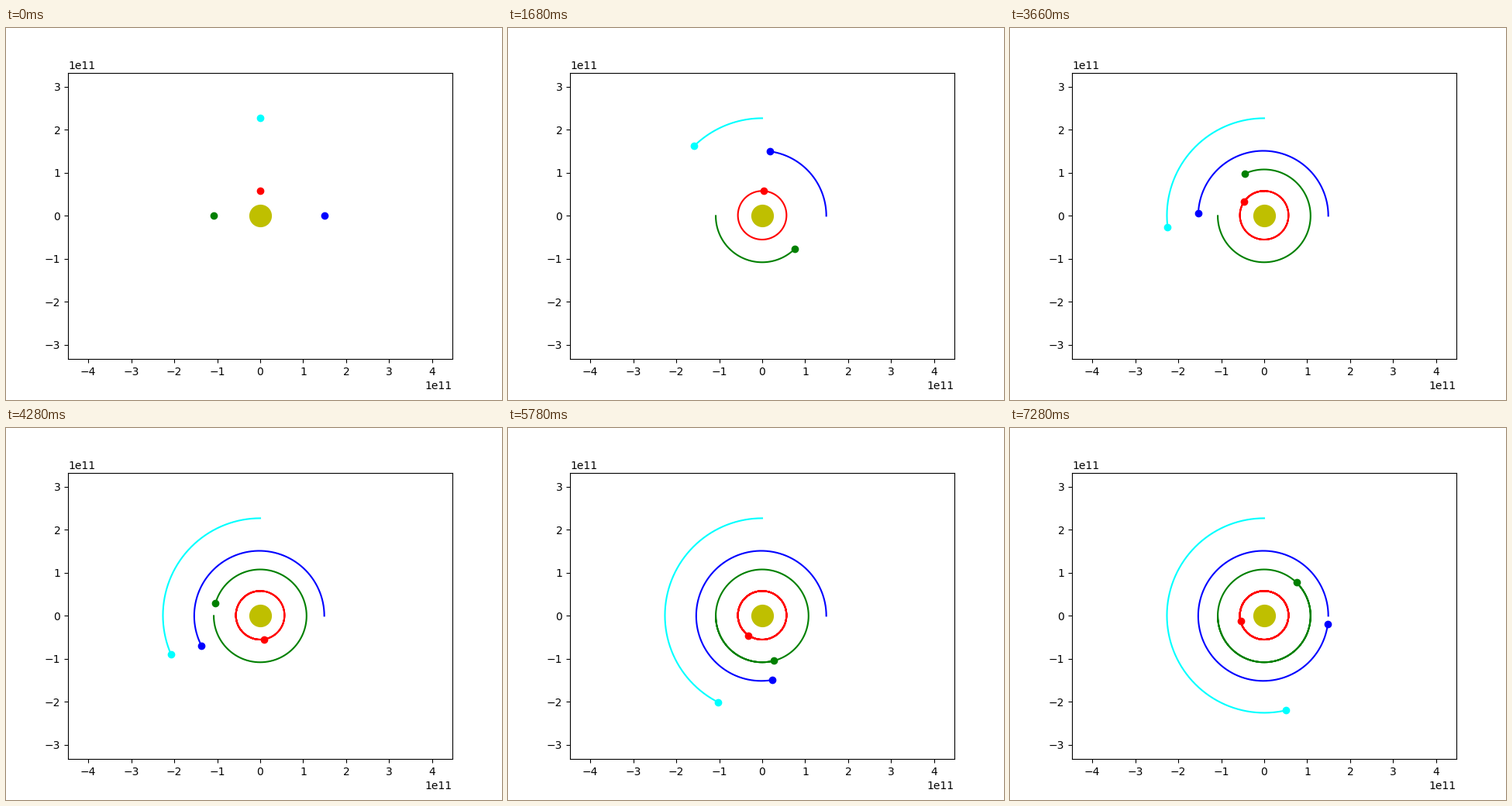
A matplotlib script for the animation above (7.3 s loop, 640 by 480 pixels).

```python
import numpy as np
import matplotlib.pyplot as plt
from matplotlib.animation import FuncAnimation

DAYS = 365
AU = 1.496e11
YEAR = 365.25

# colour, start distance (m), start angle (deg), period (days)
PLANETS = [
    ("red", 5.79e10, 90, 84.82),
    ("green", 1.08e11, 180, 223.7),
    ("blue", 1.49e11, 0, 371.2),
    ("cyan", 2.27e11, 90, 679.0),
]


def orbit(r0, start, period):
    """Daily positions on a Kepler ellipse that starts at one of its apsides."""
    a = AU * (period / YEAR) ** (2 / 3)
    ecc = 1 - r0 / a  # negative when starting at the far end
    mean = 2 * np.pi * np.arange(DAYS) / period
    anomaly = mean.copy()
    for _ in range(8):
        anomaly = mean + ecc * np.sin(anomaly)
    x = a * (np.cos(anomaly) - ecc)
    y = a * np.sqrt(1 - ecc**2) * np.sin(anomaly)
    c, s = np.cos(np.radians(start)), np.sin(np.radians(start))
    return c * x - s * y, s * x + c * y


fig = plt.figure(figsize=(6.4, 4.8), dpi=100)
ax = fig.add_axes([0.125, 0.11, 0.775, 0.77])
y_max = 3.33e11
x_max = y_max * 496 / 369.6
ax.set_xlim(-x_max, x_max)
ax.set_ylim(-y_max, y_max)

ax.plot([0], [0], "o", color="y", markersize=20)
bodies = []
for color, r0, start, period in PLANETS:
    trail, = ax.plot([], [], color=color)
    dot, = ax.plot([], [], "o", color=color)
    bodies.append((trail, dot, *orbit(r0, start, period)))


def update(day):
    artists = []
    for trail, dot, x, y in bodies:
        trail.set_data(x[:day + 1], y[:day + 1])
        dot.set_data(x[day:day + 1], y[day:day + 1])
        artists += [trail, dot]
    return artists


anim = FuncAnimation(fig, update, frames=DAYS, interval=20, repeat=True,
                     repeat_delay=0, blit=False)
plt.show()
```
